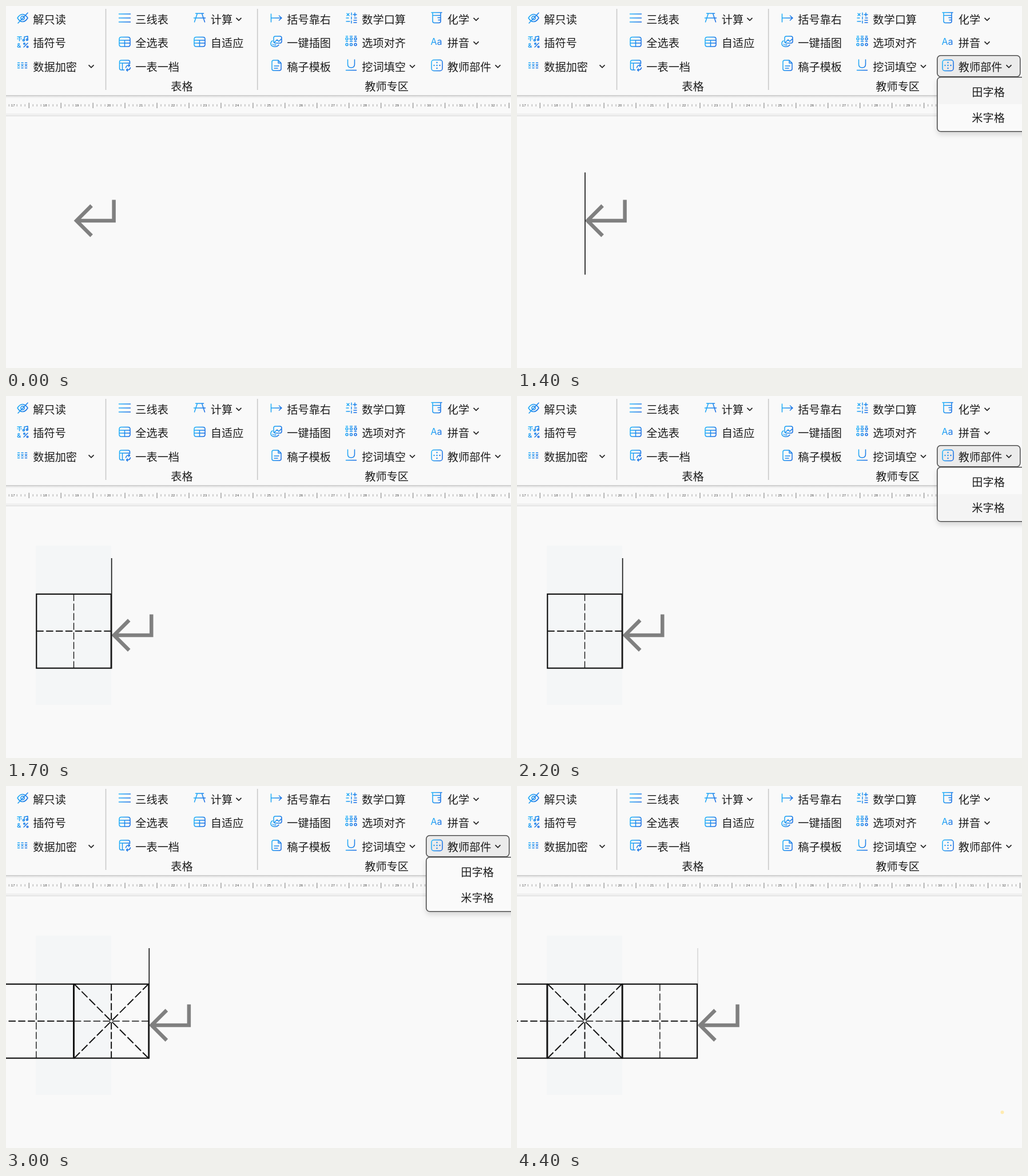
Recreate the animation shown at these times as an HTML page. Size 883x634 px, loop 4.5 s.

```html
<!DOCTYPE html>
<html lang="zh-CN">
<head>
<meta charset="utf-8">
<title>教师部件</title>
<style>
html, body { margin: 0; width: 100%; height: 100%; overflow: hidden; background: #f9f9f9; }
svg { display: block; width: 100%; height: 100%; }
text { font-family: "Noto Sans CJK SC", "Noto Sans CJK", sans-serif; font-size: 19.2px; fill: #1c1c1c; }
.icon { fill: none; stroke: url(#blue); stroke-width: 1.5; stroke-linecap: round; stroke-linejoin: round; }
.icon text { font: 600 11px Inter, sans-serif; fill: url(#blue); stroke: none; }
.icon .letters { font: 400 16px Inter, sans-serif; }
.icon .dot { fill: url(#blue); stroke: none; }
.chevron { fill: none; stroke: #222; stroke-width: 1.7; }
#ruler text { font: 6px "Liberation Sans", Arial, sans-serif; fill: #444; text-anchor: middle; }
.minor { stroke: #999; stroke-width: .9; }
.major { stroke: #777; }
#menu { filter: drop-shadow(0 5px 4px rgba(0, 0, 0, .13)); }
.frame { stroke: #505050; stroke-width: 1.6; }
.cell { fill: none; stroke: #141414; stroke-width: 2.2; }
.dash { stroke-width: 2; }
.thin { stroke-width: 1.4; }
.return { fill: none; stroke: #808080; stroke-width: 6.5; }
.caret { stroke: #1a1a1a; stroke-width: 1.7; }
</style>
</head>
<body>
<svg viewBox="0 0 883 634">
  <defs>
    <linearGradient id="blue" gradientUnits="userSpaceOnUse" x1="-10" y1="-4" x2="10" y2="4">
      <stop stop-color="#1fb2fa"/><stop offset="1" stop-color="#1769e2"/>
    </linearGradient>
    <linearGradient id="shade" x2="0" y2="1">
      <stop stop-color="#e3e3e3"/><stop offset="1" stop-color="#f9f9f9"/>
    </linearGradient>
  </defs>
  <rect width="883" height="634" fill="#f9f9f9"/>
  <rect y="157" width="883" height="5" fill="url(#shade)"/>
  <path d="M0 157H883" stroke="#c6c6c6" stroke-width="1.6"/>
  <rect y="188" width="883" height="4" fill="#f0f0f0"/>
  <path d="M0 192.5H883" stroke="#dadada"/>
  <path d="M174.5 5V147M439.7 5V147" stroke="#c9c9c9" stroke-width="1.6"/>
  <g id="ruler"></g>
  <g id="page"></g>
  <rect id="button" class="frame" x="734.8" y="86.8" width="145" height="37" rx="6" fill="#ebebeb"/>
  <g id="ribbon"></g>
  <g id="menu">
    <rect class="frame" x="734.8" y="124.8" width="170" height="95" rx="6" fill="#fafafa"/>
    <rect id="first" x="736" y="126" width="150" height="46" rx="4" fill="#f4f4f4"/>
    <rect id="second" x="736" y="172" width="150" height="46" rx="4" fill="#f4f4f4"/>
    <g id="items"></g>
  </g>
  <circle id="spot" cx="848.5" cy="571.5" r="3" fill="#ffebb0"/>
</svg>
<script>
const LOOP = 4500;
const $ = id => document.getElementById(id);
const label = (x, y, words) => `<text x="${x + .3}" y="${y + 7.6}">${words}</text>`;

// Each entry of steps is [time in ms, opacity], held until the next one.
function blink(el, steps) {
  const all = steps[0][0] ? [[0, 0], ...steps] : steps;
  const frames = all.map(([time, opacity]) => ({ offset: time / LOOP, opacity, easing: 'step-end' }));
  frames.push({ offset: 1, opacity: all[all.length - 1][1] });
  el.animate(frames, { duration: LOOP, iterations: Infinity });
}

const ROWS = [23, 64.5, 106];
const columns = [
  [47, ['解只读', '插符号', '数据加密']],
  [226, ['三线表', '全选表', '一表一档']],
  [357.5, ['计算', '自适应']],
  [491, ['括号靠右', '一键插图', '稿子模板']],
  [622, ['数学口算', '选项对齐', '挖词填空']],
  [771.5, ['化学', '拼音', '教师部件']]
];

const path = d => `<path d="${d}"/>`;
const dots = points => points.map(([x, y]) => `<circle class="dot" cx="${x}" cy="${y}" r="1.2"/>`).join('');
const table = path('M-6-8.5H6Q9.5-8.5 9.5-5V4.5Q9.5 8 6 8H-6Q-9.5 8-9.5 4.5V-5Q-9.5-8.5-6-8.5ZM-9.5-3H9.5M-9.5 2H9.5M0-3V8');
const rings = y => [-7.5, 0, 7.5].map(x => `<circle cx="${x}" cy="${y}" r="2"/>`).join('');
const crosses = [-6.5, 0, 6.5].map(x => `M${x - 1.5}-1.5l3 3m0-3l-3 3`).join('');

const icons = [
  [29, 21, path('M-9 0Q-5-6.5 0-6.5T9 0Q5 6.5 0 6.5T-9 0ZM-8 9L9-9') + '<circle r="3.2"/>'],
  [29, 63, path('M-9-9H-2M-5.5-9V-2M-9-5.5h1M-3-5.5h1M3-3V-9L9-10V-4') +
    '<circle cx="1.8" cy="-3" r="1.5"/><circle cx="7.8" cy="-4" r="1.5"/>' +
    '<text x="-10" y="10">&amp;</text>' + path('M2 9L9 2') +
    '<circle cx="3" cy="3" r="1.3"/><circle cx="8.5" cy="8.5" r="1.3"/>'],
  [28.5, 104, path(crosses + 'M-8-4.5h3M-1.5-4.5h3M5-4.5h3M-8 4.5h3M-1.5 4.5h3M5 4.5h3')],
  [207.5, 21, path('M-10-7H10M-10 0H10M-10 7H10')],
  [207.5, 63, table],
  [207.5, 104, path('M-1 8H-6Q-9 8-9 5V-6Q-9-9-6-9H6Q9-9 9-6V-3M-9-4H9M-4-4V8') +
    path('M2 4Q3 0 6 0L9 0M7-2L9 0L7 2M10 4Q9 8 5 8H3M5 6L3 8L5 10')],
  [338.5, 21, path('M-7-8H7M-10 0H10M-4-8L-9 7M4-8L9 7')],
  [338.5, 63, table],
  [472.5, 21, path('M-9-7V7M-9 0H9M5-4L9.5 0L5 4')],
  [473, 62, path('M-3-9H6Q9-9 9-6V0Q9 3 6 3H-2Q-5 3-5 0V-6Q-5-9-2-9M-4 2L1-3L4 0L9-5') +
    path('M-7-1Q-10 0-10 4Q-10 8-5 9Q1 10 4 6M-7 5Q-4 7-1 6')],
  [473, 104, path('M-5-9H3L8-4V6Q8 9 5 9H-5Q-8 9-8 6V-6Q-8-9-5-9ZM3-9V-4H8M-4 1H4M-4 5H2')],
  [604, 21, path('M0-9V-5M0-2V2M0 5V9M-9 0H-5M5 0H9M-8-8L-4-4M-4-8L-8-4M6-9V-3M3-6H9M-9 6H-3M4 4H9M4 8H9')],
  [603.5, 62, path('M-9-9H-6M-2-9H2M6-9H9M-9 0H-6M-2 0H2M6 0H9') + rings(-4.5) + rings(5.5)],
  [603.5, 103, path('M-6-9V-1Q-6 5 0 5T6-1V-9M-9 9.5H9')],
  [753, 20.5, path('M-9-9H9M-7-9V6Q-7 9-4 9H4Q7 9 7 6V-9M-7-4H7M2 0H7M3 4H7')],
  [753, 62.5, '<text class="letters" x="-10.5" y="5.5">Aa</text>'],
  [753.5, 104, '<rect x="-9.5" y="-9.5" width="19" height="19" rx="4"/>' +
    dots([[0, 0], [-5, 0], [5, 0], [0, -5], [0, 5]])]
];
const chevrons = [[149, 105.5], [407, 23], [822, 23], [822, 64.5], [710.5, 105.5], [860, 105.5]];

$('ribbon').innerHTML =
  columns.map(([x, words]) => words.map((word, row) => label(x, ROWS[row], word)).join('')).join('') +
  label(288, 140.5, '表格') + label(627, 140.5, '教师专区') +
  icons.map(([x, y, art]) => `<g class="icon" transform="translate(${x} ${y})">${art}</g>`).join('') +
  chevrons.map(([x, y]) => `<path class="chevron" d="M${x - 4.5} ${y - 2.2}l4.5 4.5l4.5-4.5"/>`).join('');
$('items').innerHTML = label(795, 150, '田字格') + label(795, 195.5, '米字格');

// Ruler: a number every eight ticks, a tall tick midway between numbers.
let ruler = '', minor = '', major = '';
for (let i = -1; i < 125; i++) {
  const x = 12.2 + i * 6.995;
  if (i % 8 === 0) ruler += `<text x="${x}" y="176.2">${17 + i / 8}</text>`;
  else if (i % 8 === 4) major += `M${x} 169.5V179`;
  else minor += `M${x} 172V176`;
}
$('ruler').innerHTML = ruler + `<path class="minor" d="${minor}"/><path class="major" d="${major}"/>`;

const PITCH = 131.3, HALF = 65.25, CENTER = 118.5, GAP = 4.4;

// A dashed line with whole dashes at both ends and a gap in the middle.
function dashed(x, y, dashes, extra = '') {
  const dash = (2 * Math.hypot(x, y) - (dashes - 1) * GAP) / dashes;
  return `<path class="dash ${extra}" stroke-dasharray="${dash} ${GAP}" d="M${-x} ${-y}L${x} ${y}"/>`;
}

function cell(x, kind) {
  const star = kind === 'star';
  return `<g class="cell" transform="translate(${x} 411.8)">
    <rect x="-${HALF}" y="-${HALF - .4}" width="${2 * HALF}" height="${2 * HALF - .8}"/>
    ${dashed(HALF, 0, 8, star ? 'thin' : '')}${dashed(0, HALF, 8, star ? '' : 'thin')}
    ${star ? dashed(HALF, HALF, 10) + dashed(HALF, -HALF, 10) : ''}</g>`;
}

// The line of cells stays centred, so every insertion shifts it by half a cell.
function stage(kinds) {
  const n = kinds.length, shift = n * PITCH / 2;
  const cells = kinds.map((kind, i) => cell(CENTER + (i - (n - 1) / 2) * PITCH, kind)).join('');
  const band = n ? '<rect x="52" y="262" width="132" height="279" fill="#f4f6f7"/>' : '';
  const [top, bottom] = n ? [284, 477.5] : [291.5, 470.5];
  const x = 119 + shift;
  return `<g>${band}${cells}
    <path class="return" transform="translate(${shift} ${n ? 43 : 0})"
      d="M188.6 339.5V376H123.5M149.6 349.6L123.2 376L149.6 402.4"/>
    <path class="caret" d="M${x} ${top}V${bottom}"/></g>`;
}

const stages = [
  { cells: [], from: 0, to: 1600, caret: [[0, 0], [800, .2], [900, 1]] },
  { cells: ['cross'], from: 1600, to: 2500 },
  { cells: ['cross', 'star'], from: 2500, to: 3400 },
  { cells: ['cross', 'star', 'cross'], from: 3400, caret: [[0, 1], [3900, .4], [4000, 0], [4400, .14]] }
];
$('page').innerHTML = stages.map(s => stage(s.cells)).join('');
stages.forEach((s, i) => {
  const group = $('page').children[i];
  blink(group, s.to ? [[s.from, 1], [s.to, 0]] : [[s.from, 1]]);
  if (s.caret) blink(group.querySelector('.caret'), s.caret);
});

blink($('button'), [[1100, .5], [1200, 1], [1600, 0], [1900, .5], [2000, 1], [2500, 0], [2900, .5], [3000, 1], [3400, 0]]);
blink($('menu'), [[1300, 1], [1600, 0], [2100, 1], [2500, 0], [3000, 1], [3400, 0]]);
blink($('first'), [[1400, 1], [1600, 0]]);
blink($('second'), [[2200, 1], [2500, 0]]);
blink($('spot'), [[4400, 1]]);
</script>
</body>
</html>
```
